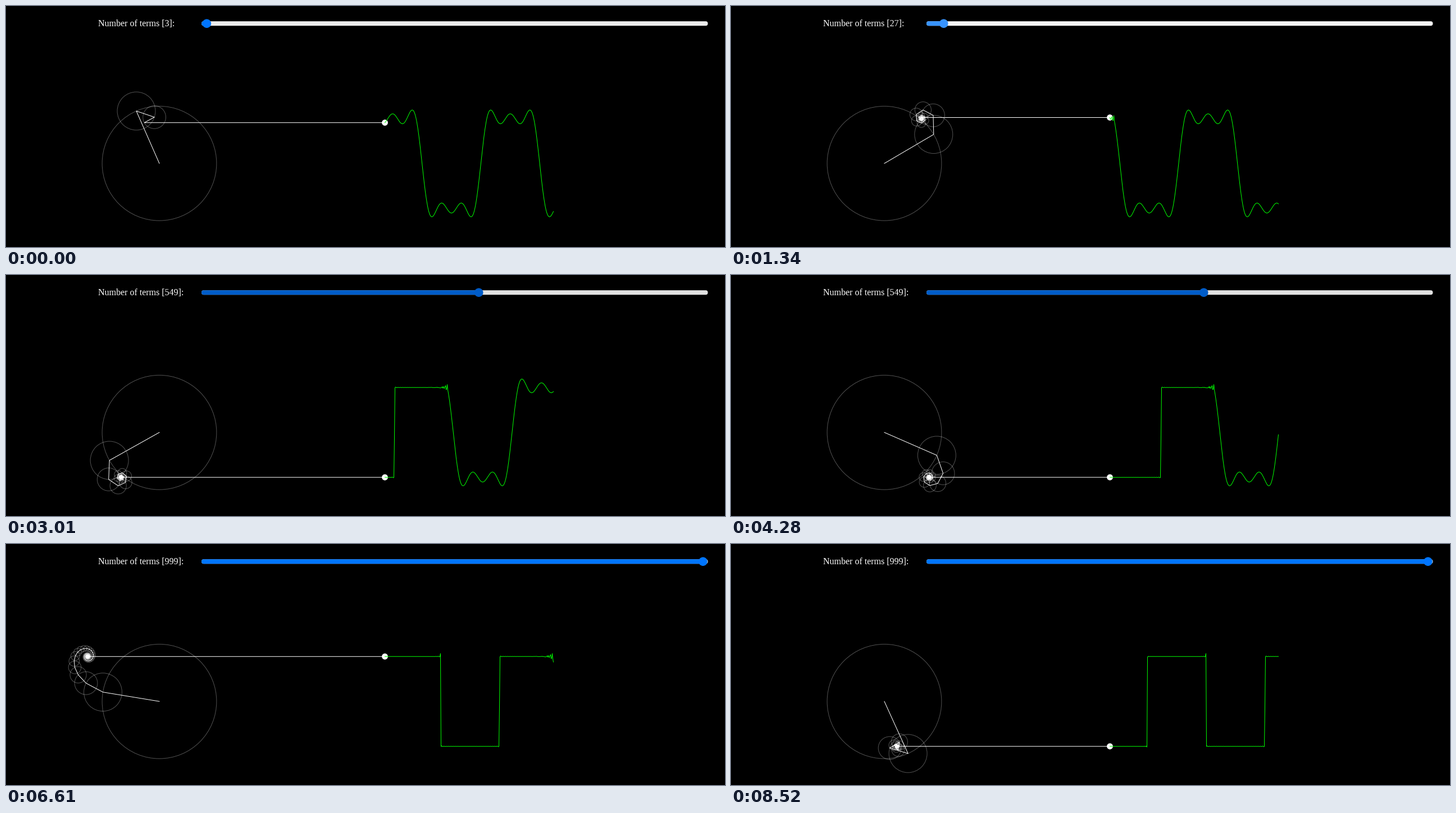
Recreate the animation shown at these times as a matplotlib script. Size 1280 by 429 pixels, loop 8540 ms.

```python
import numpy as np
import matplotlib.pyplot as plt
from matplotlib.animation import FuncAnimation
from matplotlib.collections import EllipseCollection
from matplotlib.patches import Circle, FancyBboxPatch

W, H, DPI = 1280, 429, 100
PX = 72 / DPI                    # points per pixel
INTERVAL, FRAMES = 20, 427

CX, CY = 273.0, 280.2            # centre of the epicycles
R = 80 * 4 / np.pi               # radius of the first circle
WAVE_X, TRAIL = 674.5, 300
STEP, START = 0.03, 2370         # radians per step, steps taken before the loop
MAX_CIRCLES = 300
TRACK_X, TRACK_W, TRACK_Y = 348, 901.5, 31.2

# simulation speed: it slows down as terms are added
TIME = [0, 1340, 1480, 1720, 3000, 4280, 5140, 5500, 6070, 6600, 8520]
STEPS = [0, 161, 178, 194, 265, 339, 391, 412, 433, 452, 524]

# number of terms against simulation step
DRAG = [153, 154, 155, 156, 157, 158, 159, 161, 166, 178, 194, 218, 400, 418]
TERMS = [3, 15, 17, 17, 19, 19, 21, 27, 60, 130, 300, 549, 549, 999]

# thumb colour, track colour
IDLE = ("#0075ff", "#ececec")
HOVER = ("#005cc8", "#e1e1e1")
ACTIVE = ("#3793ff", "#f5f5f5")
STATES = [(0, IDLE), (700, HOVER), (1200, ACTIVE), (2300, HOVER),
          (5260, ACTIVE), (5760, HOVER), (5920, IDLE)]


def terms_at(step):
    return int(round(np.interp(step, DRAG, TERMS)))


def chain(step):
    """Joints of the rotating arms, from the centre to the tip."""
    n = 2 * np.arange(terms_at(step)) + 1
    phase = n * STEP * (START + step)
    x = CX + np.cumsum(R / n * np.cos(phase))
    y = CY - np.cumsum(R / n * np.sin(phase))
    return np.append(CX, x), np.append(CY, y)


heights = np.array([chain(k)[1][-1] for k in range(-TRAIL, STEPS[-1] + 1)])

fig = plt.figure(figsize=(W / DPI, H / DPI), dpi=DPI, facecolor="black")
ax = fig.add_axes([0, 0, 1, 1])
ax.set_xlim(0, W)
ax.set_ylim(H, 0)
ax.axis("off")


def bar(width):
    patch = FancyBboxPatch((TRACK_X, TRACK_Y - 4), width, 8, lw=0,
                           boxstyle="round,pad=0,rounding_size=4")
    return ax.add_patch(patch)


label = ax.text(164.3, 36.2, "", color="white", family="Liberation Serif",
                size=16 * PX, va="baseline")
track = bar(TRACK_W)
fill = bar(10)
thumb = ax.add_patch(Circle((0, TRACK_Y), 7.8, lw=0))

sizes = 2 * R / (2 * np.arange(MAX_CIRCLES) + 1)
circles = EllipseCollection(sizes, sizes, np.zeros(MAX_CIRCLES), units="xy",
                            offsets=np.zeros((MAX_CIRCLES, 2)),
                            offset_transform=ax.transData,
                            facecolors="none", edgecolors=(1, 1, 1, 0.32),
                            linewidths=PX, zorder=2)
ax.add_collection(circles, autolim=False)
arms, = ax.plot([], [], color="white", lw=PX, zorder=3)
dot = ax.add_patch(Circle((WAVE_X, CY), 5.4, color="white", lw=0, zorder=4))
wave, = ax.plot([], [], color="#00ff00", lw=PX, zorder=5)
wave_x = WAVE_X + np.arange(TRAIL + 1)


def draw_slider(t, terms):
    accent, base = [s for start, s in STATES if t >= start][-1]
    x = 355.6 + 0.887 * (terms - 1)
    label.set_text(f"Number of terms [{terms}]:")
    track.set_facecolor(base)
    fill.set_facecolor(accent)
    fill.set_width(x - TRACK_X)
    thumb.set_facecolor(accent)
    thumb.center = (x, TRACK_Y)


def update(i):
    t = i * INTERVAL
    step = int(np.interp(t, TIME, STEPS) + 1e-6)
    x, y = chain(step)
    draw_slider(t, len(x) - 1)

    # unused circles wait outside the stage
    centres = np.full((MAX_CIRCLES, 2), -999.0)
    count = min(len(x) - 1, MAX_CIRCLES)
    centres[:count] = np.column_stack([x[:count], y[:count]])
    circles.set_offsets(centres)

    arms.set_data(np.append(x, WAVE_X), np.append(y, y[-1]))
    dot.center = (WAVE_X, y[-1])
    wave.set_data(wave_x, heights[step:step + TRAIL + 1][::-1])
    return label, track, fill, thumb, circles, arms, dot, wave


anim = FuncAnimation(fig, update, frames=FRAMES, interval=INTERVAL,
                     repeat=True, blit=False)
plt.show()
```
